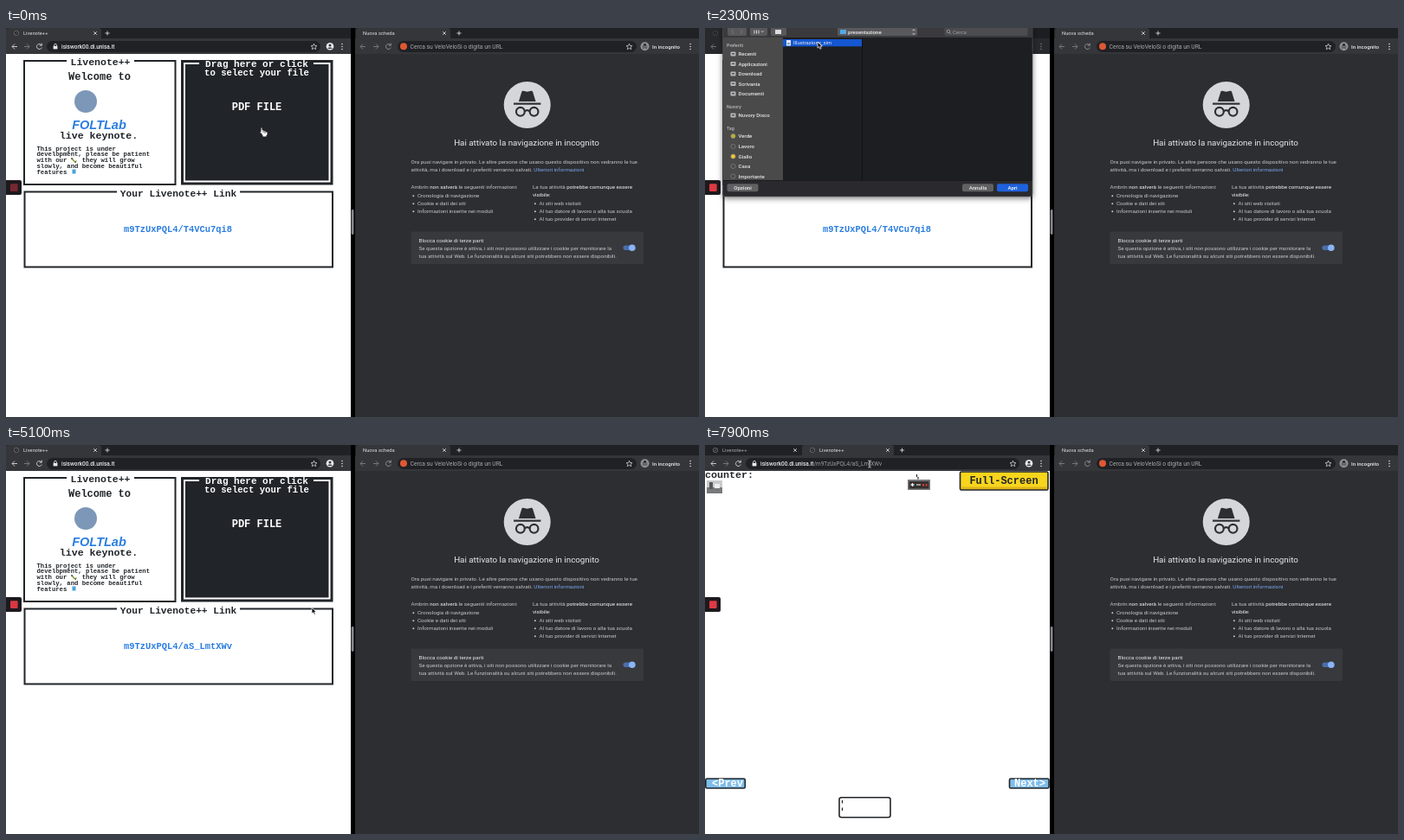
Animation, 800 px wide and 450 px high, one loop 8 s. Source, as an HTML page:

```html
<!DOCTYPE html>
<html lang="it">
<head>
<meta charset="utf-8">
<title>Livenote++</title>
<style>
html, body { margin: 0; width: 100%; height: 100%; overflow: hidden; background: #000; }
svg { display: block; width: 800px; height: 450px; }
text { white-space: pre; font-family: Roboto, "Open Sans", sans-serif; }
.px { font-family: "Liberation Mono", "DejaVu Sans Mono", monospace; font-weight: 700; }
.md { font-weight: 500; }
.b { font-weight: 700; }
.mid { text-anchor: middle; }
.end { text-anchor: end; }
</style>
</head>
<body>
<svg id="stage" viewBox="0 0 800 450"></svg>
<script>
const INK = '#212529', BLUE = '#2a7de1', PALE = '#e8eaed', GREY = '#c6c7cb';

const rect = (x, y, w, h, fill, extra = '') =>
  `<rect x="${x}" y="${y}" width="${w}" height="${h}" fill="${fill}" ${extra}/>`;
const frame = (x, y, w, h, stroke, extra = '') =>
  rect(x, y, w, h, 'none', `stroke="${stroke}" stroke-width="2" ${extra}`);
const circle = (x, y, r, fill, extra = '') => `<circle cx="${x}" cy="${y}" r="${r}" fill="${fill}" ${extra}/>`;
const line = (d, stroke, w = 1, extra = '') =>
  `<path d="${d}" fill="none" stroke="${stroke}" stroke-width="${w}" ${extra}/>`;
const text = (x, y, s, size, fill, cls = '') =>
  `<text x="${x}" y="${y}" font-size="${size}" fill="${fill}" class="${cls}">${s}</text>`;
const pixel = (x, y, s, size, fill = INK, cls = 'mid') => text(x, y, s, size, fill, 'px ' + cls);
const group = (id, body, extra = '') => `<g id="${id}" ${extra}>${body}</g>`;

// Browser furniture
const cross = (x, y, r = 2, c = '#d5d6d9') => line(`M${x-r} ${y-r}l${2*r} ${2*r}m0 ${-2*r}l${-2*r} ${2*r}`, c, .9);
const plus = (x, y) => line(`M${x-2.5} ${y}h5m-2.5 -2.5v5`, '#d5d6d9', .9);
const arrow = (x, dir, c) => line(`M${x-3*dir} 21.5h${6*dir}m${-3*dir} -3l${3*dir} 3l${-3*dir} 3`, c, 1);
const reload = (x, c) => line(`M${x+2.6} 20a3 3 0 1 0 .2 2.6m0 -5v2.6h-2.6`, c, 1);
const dots = x => [18.5, 21.5, 24.5].map(y => circle(x, y, .75, PALE)).join('');
const star = x => line(`M${x} 18.2l1 2.3 2.4 .2 -1.8 1.6 .6 2.4 -2.2 -1.3 -2.2 1.3 .6 -2.4 -1.8 -1.6 2.4 -.2z`, PALE, .7);
const lock = line('M55.6 21v-1.3a1.4 1.4 0 0 1 2.8 0V21', PALE, .8) + rect(54.6, 20.8, 4.8, 3.6, PALE);
const tabIcon = x => circle(x, 6, 2.7, '#26272a', 'stroke="#77797d" stroke-width=".7"') + line(`M${x-1.8} 7.8l3.6 -3.6`, '#77797d', .6);

const tab = (x, w, label, active, icon) =>
  (active ? `<path d="M${x} 12V3q0 -3 3 -3h${w-6}q3 0 3 3v9z" fill="#35363a"/>` : '') +
  (icon ? tabIcon(x + 12) : '') +
  text(x + (icon ? 20 : 8), 8.2, label, 5.8, active ? '#dfe0e3' : '#a9abaf') + cross(x + w - 7, 6, 1.8);

const barBase = (x, w) => rect(x, 0, w, 12, '#202124') + rect(x, 12, w, 18, '#35363a');

const leftBar = barBase(0, 398) +
  group('oneTab', tab(0, 110, 'Livenote++', true, true) + plus(117, 6)) +
  group('twoTabs', tab(0, 111, 'Livenote++', false, true) + tab(112, 106, '', true, false) + plus(227.5, 6) +
    group('tabLoading', line('M116.5 6a2.6 2.6 0 0 1 2.6 -2.6', '#c9cace', 1) +
      text(126, 8.2, 'https://isiswork00.di.unisa.it/m', 5.8, '#dfe0e3')) +
    group('tabReady', tabIcon(124) + text(132, 8.2, 'Livenote++', 5.8, '#dfe0e3'))) +
  arrow(10, -1, '#c5c6ca') + arrow(24, 1, '#77787c') +
  group('reload', reload(38.5, '#c5c6ca')) + group('stop', cross(38.5, 21.3, 2.6)) +
  rect(47, 15, 316, 13, '#202124', 'rx="6.5"') + lock +
  text(64, 23.8, 'isiswork00.di.unisa.it<tspan id="path" fill="#a0a2a6" font-weight="400">/m9TzUxPQL4/aS_LmtXWv</tspan>', 6.45, PALE, 'md') +
  star(355.5) + circle(374, 21.3, 4.3, PALE) + circle(374, 20.1, 1.5, '#35363a') +
  '<path d="M371.2 24a3 2.2 0 0 1 5.6 0z" fill="#35363a"/>' + dots(388);

// Private-browsing pane
const hatAndGlasses = (x, y, k, c) => `<g transform="translate(${x} ${y}) scale(${k})">` +
  `<path d="M-10 -4L-6.5 -15.5Q-6 -17 -4.5 -16.5L0 -15.5L4.5 -16.5Q6 -17 6.5 -15.5L10 -4z" fill="${c}"/>` +
  rect(-16, -2.5, 32, 2.2, c) + circle(-8, 8, 5, 'none', `stroke="${c}" stroke-width="2.2"`) +
  circle(8, 8, 5, 'none', `stroke="${c}" stroke-width="2.2"`) + line('M-3 7.5Q0 5 3 7.5', c, 2.2) + '</g>';
const bullets = (x, y, items) => items.map((s, i) =>
  circle(x + 2.8, y + 9 * i - 2, 1, GREY) + text(x + 7.5, y + 9 * i, s, 6.24, GREY)).join('');
const bright = s => `<tspan fill="#f4f5f7">${s}</tspan>`;

const rightPane = rect(403, 0, 397, 450, '#2d2e32') + barBase(403, 397) +
  tab(404, 109, 'Nuova scheda', true, false) + plus(523, 6) +
  arrow(412, -1, '#77787c') + arrow(427, 1, '#77787c') + reload(441.5, '#8b8c90') +
  rect(452, 15, 276, 13, '#202124', 'rx="6.5"') + circle(459, 21.3, 4, '#de5833') +
  text(466.5, 23.8, 'Cerca su VeloVeloSi o digita un URL', 6.75, '#a9abaf') + star(719.5) +
  circle(737.5, 21.3, 5, '#8f9195') + hatAndGlasses(737.5, 21.3, .19, '#202124') +
  text(746, 23.7, 'In incognito', 6.1, PALE, 'md') + dots(790) +
  circle(601.7, 89, 27, '#d5d6da') + hatAndGlasses(601.7, 89, .98, '#2d2e32') +
  text(601, 136, 'Hai attivato la navigazione in incognito', 9.8, PALE, 'mid') +
  text(467.5, 157, 'Ora puoi navigare in privato. Le altre persone che usano questo dispositivo non vedranno le tue', 6.24, GREY) +
  text(467.5, 165.8, 'attività, ma i download e i preferiti verranno salvati. <tspan fill="#7ba7ec">Ulteriori informazioni</tspan>', 6.24, GREY) +
  text(467.5, 185.8, `Ambrin ${bright('non salverà')} le seguenti informazioni:`, 6.24, GREY) +
  bullets(467.5, 196.2, ['Cronologia di navigazione', 'Cookie e dati dei siti', 'Informazioni inserite nei moduli']) +
  text(608, 185.8, `La tua attività ${bright('potrebbe comunque essere')}`, 6.24, GREY) +
  text(608, 194.6, bright('visibile:'), 6.24, GREY) +
  bullets(608, 205.2, ['Ai siti web visitati', 'Al tuo datore di lavoro o alla tua scuola', 'Al tuo provider di servizi Internet']) +
  rect(467.5, 235.5, 268.5, 37.5, '#38393d', 'rx="2"') +
  text(476.5, 247.8, 'Blocca cookie di terze parti', 6.24, PALE) +
  text(476.5, 257, 'Se questa opzione è attiva, i siti non possono utilizzare i cookie per monitorare la', 6.24, GREY) +
  text(476.5, 265.8, 'tua attività sul Web. Le funzionalità su alcuni siti potrebbero non essere disponibili.', 6.24, GREY) +
  rect(712.5, 251.5, 13, 5.6, '#4b6ea9', 'rx="2.8"') + circle(722.8, 254.3, 3.8, '#8ab4f8');

// Home page with its three panels
const intro = ['This project is under', 'development, please be patient', 'with our  , they will grow',
  'slowly, and become beautiful', 'features'];
const homePage = rect(0, 30, 398, 420, '#fff') +
  frame(21, 38, 174.5, 143, INK) + rect(70, 36, 78, 4, '#fff') + pixel(109, 43, 'Livenote++', 11.5) +
  pixel(108, 60, 'Welcome to', 12) + circle(92, 85, 13, '#7c97b8') +
  `<text x="107.5" y="116.5" font-size="14.5" class="mid" fill="${BLUE}" font-weight="700" font-style="italic" style="font-family:'Liberation Sans',sans-serif">FOLTLab</text>` +
  pixel(107, 127.5, 'live keynote.', 11.6) +
  intro.map((s, i) => pixel(35.5, 141.6 + 6.8 * i, s, 7.25, INK, '')).join('') +
  line('M76 151l4 4.5', '#8a9a2c', 1.6) + line('M75.5 150.5l1 1', INK, 1.6) + rect(76.5, 163.5, 4, 5, '#4ba3d9') +
  rect(202, 37, 175.5, 144.5, INK) + frame(206, 41, 167.5, 136.5, '#fff') + rect(223, 39, 132, 5, INK) +
  pixel(289.5, 44.8, 'Drag here or click', 11, '#fff') + pixel(289.5, 54.5, 'to select your file', 10.6, '#fff') +
  pixel(289.5, 95, 'PDF FILE', 12, '#fff') +
  frame(21.5, 189.5, 355.5, 87, INK) + rect(128, 187, 142, 5, '#fff') + pixel(199, 194.5, 'Your Livenote++ Link', 11.2) +
  `<text id="link" x="136" y="235.7" font-size="10.42" fill="${BLUE}" class="px"></text>` +
  rect(136, 236.6, 125, 1, BLUE, 'id="underline"');

// Slide viewer page
const nesButton = (x, y, w, h, fill) => rect(x, y, w, h, fill, `rx="1.5" stroke="${INK}" stroke-width="1.6"`);
const viewerPage = rect(0, 30, 398, 420, '#fff') + pixel(0, 38, 'counter:', 11.7, INK, '') +
  rect(2, 41, 18, 15, '#c9cac9') + rect(2, 49, 18, 7, '#77797a') + rect(5, 43, 4, 8, '#55585a') + rect(11, 45, 6, 5, '#eee') +
  line('M244.5 34v3m1.5 0v2.5', INK, 1.2) +
  rect(234, 40, 26, 12, '#77787a') + rect(235.5, 42, 23, 8.5, '#35302f') +
  line('M237.5 46h4m-2 -2v4', '#eee', 1.3) + rect(244, 45, 5, 2, '#999') + rect(251, 45, 2, 2.5, '#d23b38') + rect(254.5, 45, 2, 2.5, '#d23b38') +
  nesButton(294.5, 31, 101.5, 21, '#f7d51d') + rect(296, 48.5, 98.5, 2.5, '#e0b51b') + pixel(345, 45, 'Full-Screen', 12) +
  nesButton(.8, 386, 45.5, 11, '#7fbdeb') + pixel(26, 395.2, '&lt;Prev', 12, '#fff') +
  nesButton(351.5, 386, 45.5, 11, '#7fbdeb') + pixel(375, 395.2, 'Next&gt;', 12, '#fff') +
  rect(155, 407.7, 59, 23, '#fff', `rx="2.5" stroke="${INK}" stroke-width="1.6"`) +
  group('marks', line('M158.5 411v3.5m0 5v3.5', INK, 1.3));

// File chooser sheet
const sideRows = [['Recenti', 30], ['Applicazioni', 41.5], ['Download', 53], ['Scrivania', 64.5], ['Documenti', 76],
  ['Nuvory Disco', 101], ['Verde', 125], ['Lavoro', 137], ['Giallo', 148.5], ['Casa', 160], ['Importante', 171.5]];
const tagFill = { Verde: '#b9b12e', Giallo: '#f1c52d', Lavoro: 'none', Casa: 'none', Importante: 'none' };
const sideRow = ([name, y]) => text(38.5, y + 2.2, name, 6.1, '#e6e6e7', 'md') +
  (name in tagFill ? circle(32.5, y, 2.6, tagFill[name], 'stroke="#8d8d90" stroke-width=".6"')
    : rect(29.5, y - 2.5, 6, 5, '#b9b9bc', 'rx="1"') + rect(31, y - 1, 3, 1.6, '#5b5b5e'));
const sideHead = (y, s) => text(25, y, s, 5.3, '#b8b8ba', 'md');
const button = (x, label, fill, ink) =>
  rect(x, 180.3, 36, 9, fill, 'rx="2"') + text(x + 18, 187.2, label, 6.1, ink, 'mid md');
const info = (y, key, value) => text(191, y, key, 5.5, '#9b9b9e', 'md') + text(368, y, value, 5.6, '#e2e2e4', 'end md');
const date = 'Martedì 10 settembre 2019 10:34';

const preview = rect(223.5, 22, 112.5, 84.5, '#fff') + circle(245, 34.5, 7, '#4b8ec0') + circle(280, 35, 8, '#161616') + circle(314.5, 35, 8, '#d4552e') +
  text(227, 52, 'METODI DI PIANIFICAZIONE BASATI', 5.5, '#333', 'b') + text(227, 60, 'SU REGOLE CON', 5.5, '#333', 'b') +
  text(227.5, 77.2, 'RUST', 12, '#2f78c4', 'b') +
  text(326, 84.2, 'Dario Velutti', 2.7, '#333', 'end b') + text(326, 88, 'Prof. Renzo Melfari', 2.7, '#555', 'end') +
  text(326, 94, 'Tullio Garbesi', 2.7, '#333', 'end b') + text(326, 98, 'Ornella Pistrani', 2.7, '#555', 'end') +
  text(191, 125.5, 'Illustrazione_sim', 7.8, '#f0f0f1', 'b') + text(191, 134.5, 'PDF - 477 KB', 5.9, '#a5a5a8') +
  rect(191, 138.5, 177, .6, '#3d3e41') + text(191, 148.3, 'Informazioni', 6.3, '#f0f0f1', 'b') +
  text(367.5, 148.3, 'Mostra altro', 5.9, '#3f83d8', 'end') +
  info(159.2, 'Creato', date) + info(168, 'Modificato', date) + info(177, 'Ultima apertura', date);

const sheet = rect(20.5, -4, 357.5, 199, '#2b2b2d', 'rx="3" stroke="#55565a" stroke-width=".6" filter="url(#shadow)"') +
  rect(21, -4, 356.5, 15, '#3a3a3c') + rect(21, 11, 69, 165, '#4b4a4b') + rect(90, 11, 287.5, 165, '#1d1e21') +
  [[26, 22], [52, 20], [76, 18]].map(([x, w]) => rect(x, -2, w, 11, '#59595b', 'rx="2"')).join('') +
  line('M33 2l-2 2.5 2 2.5M41 2l2 2.5 -2 2.5', '#7f7f82', .9) + line('M57 2.5v4m2.5 -4v4m2.5 -4v4m3 -3l1.3 1.3 1.3 -1.3', '#ddd', 1) + rect(81, 2, 7, 5, '#ddd') +
  rect(153, -2, 92, 11, '#59595b', 'rx="2"') + rect(156, 2, 7, 5, '#55a7e8') + text(165, 6.8, 'presentazione', 6.1, '#eee', 'md') +
  line('M239.5 3.3l1.5 -1.6 1.5 1.6m-3 2.6l1.5 1.6 1.5 -1.6', '#eee', .8) +
  rect(276.5, -2, 96, 11, '#4c4c4f', 'rx="2"') + circle(281, 4, 1.7, 'none', 'stroke="#aaa" stroke-width=".7"') + line('M282.3 5.3l1.6 1.6', '#aaa', .8) + text(286, 6.8, 'Cerca', 6.1, '#a0a0a3') +
  sideHead(22, 'Preferiti') + sideHead(93, 'Nuvory') + sideHead(117.5, 'Tag') + sideRows.map(sideRow).join('') +
  rect(90, 13, 91, 8.3, '#1457d0', 'id="selection"') + rect(94, 14, 5, 6.5, '#e8e8ea') + rect(95, 17, 3, 2, '#79a5d2') +
  text(102, 19.4, 'Illustrazione_sim', 5.9, '#ececee') + rect(181, 11, .8, 165, '#0f1012') +
  group('preview', preview, 'clip-path="url(#columns)"') +
  rect(21, 176, 356.5, .7, '#141416') + button(25.5, 'Opzioni', '#616163', '#eee') + button(297, 'Annulla', '#616163', '#eee') +
  group('openOff', button(337, 'Apri', '#424244', '#7b7b7d')) + group('openOn', button(337, 'Apri', '#1f62dd', '#fff')) +
  group('openIdle', button(337, 'Apri', '#616163', '#eee'));

const pointers =
  group('arrow', '<path d="M0 0v7.2l1.7 -1.5 1.2 2.6 1.3 -.6 -1.2 -2.5h2.2z" fill="#111" stroke="#fff" stroke-width=".7"/>') +
  group('hand', `<path d="M-2 -4h2v3h2v1h2v1h2v4h-1v2h-5v-2h-1v-2h-2v-2h1z" fill="#fff" stroke="${INK}" stroke-width="1"/>` + line('M1 0v2m2 -1v2', INK, .7)) +
  group('ibeam', line('M-1.7 -4q1.7 0 1.7 1v6q0 1 -1.7 1m3.4 -8q-1.7 0 -1.7 1m0 6q0 1 1.7 1', '#ddd', .9));

document.getElementById('stage').innerHTML =
  '<defs><clipPath id="left"><rect width="398" height="450"/></clipPath><clipPath id="columns"><rect x="182" y="11" width="195" height="165"/></clipPath>' +
  '<filter id="shadow" x="-10%" y="-10%" width="120%" height="120%"><feDropShadow dx="0" dy="2" stdDeviation="3" flood-opacity=".5"/></filter></defs>' +
  rect(0, 0, 800, 450, '#000') +
  `<g clip-path="url(#left)">` + group('home', homePage) + group('blank', rect(0, 30, 398, 420, '#2d2e32')) + group('viewer', viewerPage) +
  leftBar + rect(0, 0, 398, 30, '#1b1c1f', 'id="dim"') + group('sheet', sheet) + '</g>' +
  rightPane + rect(398.7, 210, 2.8, 29, '#85868a', 'rx="1.4"') +
  rect(-3, 176, 21, 17, '#1d191e', 'rx="2"') + rect(5, 180.3, 8.6, 8.6, '#e63b45', 'id="record" rx="1"') +
  circle(236, 233, 15, '#8a5a3c', 'id="ripple"') + group('pointer', pointers);

const el = id => document.getElementById(id);
const show = (id, on) => { el(id).style.display = on ? '' : 'none'; };
const between = (t, a, b) => t >= a && t < b;
const ease = (t, a, b) => { const p = Math.min(1, Math.max(0, (t - a) / (b - a))); return p * p * (3 - 2 * p); };

const route = [[0, 296, 119], [700, 296, 119], [1400, 187, 54], [1900, 130, 16], [2500, 130, 16],
  [3200, 353, 188], [5300, 353, 188], [6000, 239, 237], [7100, 241, 237], [7700, 190, 22], [8000, 190, 22]];
function pointerAt(t) {
  const i = route.findIndex(p => p[0] > t), [t0, x0, y0] = route[i - 1], [t1, x1, y1] = route[i];
  const k = ease(t, t0, t1);
  return [x0 + (x1 - x0) * k, y0 + (y1 - y0) * k];
}

function draw(t) {
  const opened = t >= 6500, loaded = t >= 7000, ready = t >= 7200, linkHover = between(t, 5900, 6500);
  show('home', !opened); show('blank', opened && !loaded); show('viewer', loaded);
  show('oneTab', !opened); show('twoTabs', opened); show('path', opened);
  show('tabLoading', !ready); show('tabReady', ready);
  show('stop', opened && !ready); show('reload', !opened || ready);
  show('marks', t >= 7400);

  el('link').textContent = 'm9TzUxPQL4/' + (t < 4800 ? 'T4VCu7qi8' : 'aS_LmtXWv');
  show('underline', linkHover);

  const slide = ease(t, 850, 1150) - ease(t, 3800, 4180);
  show('sheet', slide > 0);
  el('sheet').setAttribute('transform', `translate(0 ${-205 * (1 - slide)})`);
  el('dim').setAttribute('opacity', between(t, 1000, 4200) ? (t < 3900 ? .5 : .25) : 0);
  const picked = t >= 2300;
  show('selection', picked); show('preview', t >= 2500);
  show('openOff', !picked); show('openOn', picked && t < 3800); show('openIdle', t >= 3800);

  const glow = .45 + .55 * ease(t, 0, 600);
  el('record').setAttribute('opacity', glow * (.95 + .05 * Math.cos(t / 300)));
  el('ripple').setAttribute('opacity', between(t, 6300, 7100) ? .22 * (1 - ease(t, 6800, 7100)) : 0);

  const [x, y] = pointerAt(t);
  el('pointer').setAttribute('transform', `translate(${x} ${y})`);
  const hand = t < 900 || between(t, 5900, 7150), beam = t >= 7600;
  show('hand', hand); show('ibeam', beam); show('arrow', !hand && !beam);
}

const start = performance.now();
function tick() {
  draw((performance.now() - start) % 8000);
  requestAnimationFrame(tick);
}
tick();
</script>
</body>
</html>
```
